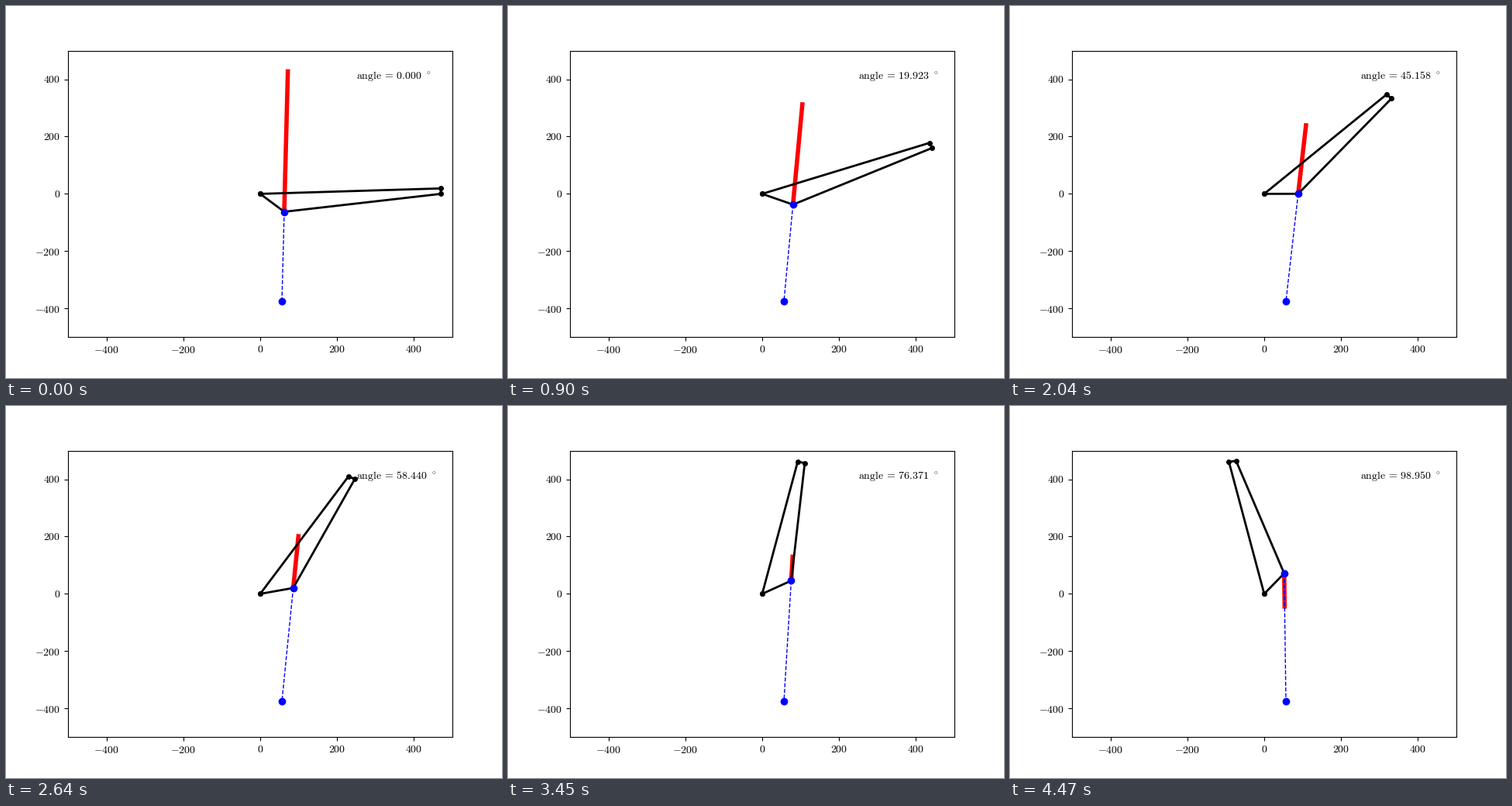
Write a matplotlib script that moves like this. It is 640x480 px and loops after 4.5 s.

```python
import numpy as np
import matplotlib.pyplot as plt
from matplotlib.animation import FuncAnimation

plt.rcParams["mathtext.fontset"] = "cm"

FRAMES = 150
STEP = 98.95 / (FRAMES - 1)      # degrees per frame
ARM, THICK = 470, 19             # lever length and tip offset
PIVOT = np.array([62.5, -62.5])  # rod joint at angle zero
BASE = np.array([56.5, -375.0])  # fixed end of the rod
LOAD = 66.4                      # load that the rod force balances

fig = plt.figure(figsize=(6.4, 4.8), dpi=100)
ax = fig.add_subplot()
ax.set(xlim=(-500, 500), ylim=(-500, 500))

ticks = range(-400, 401, 200)
ax.set_xticks(ticks, [""] * 5)
ax.set_yticks(ticks, [""] * 5)


def tick_label(value, pos, coords, shift, align):
    drop = 0.83 if value < 0 else 0
    ax.annotate(f"${value}$", pos, xycoords=coords,
                xytext=(shift[0], shift[1] - drop),
                textcoords="offset points", ha=align, va="baseline")


for v in ticks:
    tick_label(v, (v, 0), ax.get_xaxis_transform(), (0, -13.94), "center")
    tick_label(v, (0, v), ax.get_yaxis_transform(), (-7, -3.47), "right")

force, = ax.plot([], [], "r-", lw=4)
lever, = ax.plot([], [], "ko-", lw=2, ms=4)
rod, = ax.plot([], [], "bo--", lw=1)
label = ax.text(250, 400, "")


def cross(a, b):
    return a[0] * b[1] - a[1] * b[0]


def draw(i):
    deg = i * STEP
    c, s = np.cos(np.radians(deg)), np.sin(np.radians(deg))
    turn = np.array([[c, -s], [s, c]])
    joint = turn @ PIVOT
    tip = turn @ [ARM, THICK]
    corner = turn @ [ARM, 0]

    # force along the rod that balances the load's torque about the origin
    span = joint - BASE
    length = np.hypot(*span)
    size = LOAD * tip[0] * length / abs(cross(joint, BASE))
    end = joint + size * span / length

    force.set_data(*np.transpose([joint, end]))
    lever.set_data(*np.transpose([(0, 0), tip, corner, joint, (0, 0)]))
    rod.set_data(*np.transpose([joint, BASE]))
    label.set_text(r"$\mathrm{angle}\hspace{0.18}=\hspace{0.18}"
                   rf"{deg:.3f}\hspace{{0.38}}{{}}^\circ$")
    return force, lever, rod, label


anim = FuncAnimation(fig, draw, frames=FRAMES, interval=30,
                     repeat=True, repeat_delay=0)
plt.show()
```
